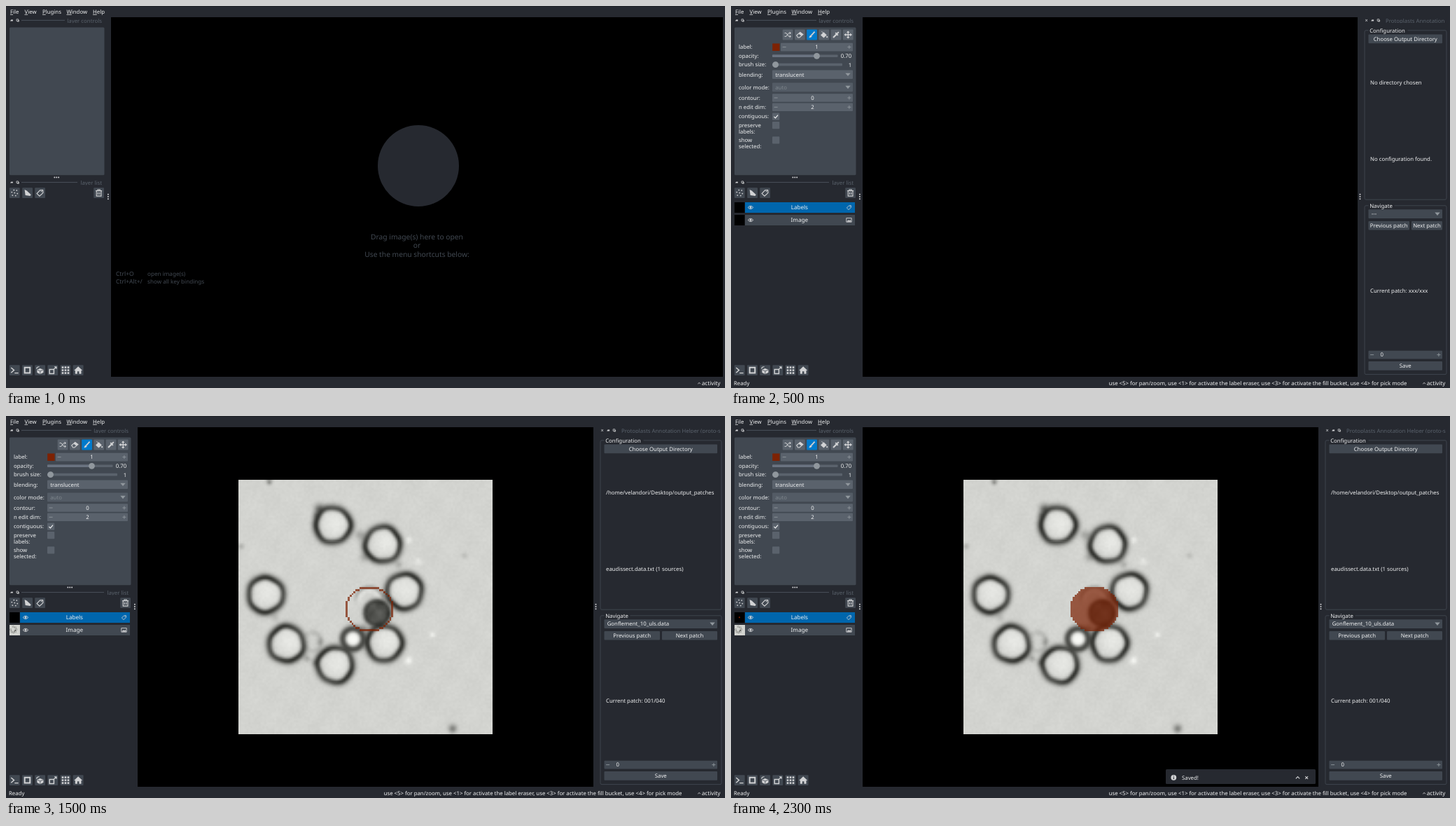
Write an HTML page with a canvas that moves like this. It is 1027x545 px and loops after 2500 ms.

```html
<!DOCTYPE html>
<html lang="en">
<head>
<meta charset="utf-8">
<title>Patch annotation</title>
<style>
html, body { margin: 0; width: 100%; height: 100%; overflow: hidden; background: #262930; }
svg { display: block; width: 100%; height: 100%; }
text { font: 7.8px "Noto Sans", sans-serif; white-space: pre; text-rendering: geometricPrecision; }
canvas { display: block; width: 100%; height: 100%; }
</style>
</head>
<body>
<svg viewBox="0 0 1027 545">
  <g id="ui"></g>
  <g id="photo">
    <foreignObject x="332" y="91" width="363" height="363"><canvas id="patch" width="128" height="128"></canvas></foreignObject>
    <foreignObject x="5" y="298" width="14.5" height="15"><canvas id="thumb" width="30" height="30"></canvas></foreignObject>
  </g>
  <g id="over"></g>
</svg>
<script>
const BG = '#262930', FG = '#414851', PRIMARY = '#5a626c', HANDLE = '#90979d',
      ICON = '#d1d2d4', TEXT = '#f0f1f2', BLUE = '#007acc', LABEL = '#7d2203';
const STEP = 500, STEPS = 5;
const PATCH = { x: 332, y: 91, n: 128, px: 363 / 128 };
const $ = id => document.getElementById(id);

// ---- drawing helpers
const rect = (x, y, w, h, fill, r = 0, more = '') =>
  `<rect x="${x}" y="${y}" width="${w}" height="${h}" rx="${r}" fill="${fill}" ${more}/>`;
const circle = (x, y, r, fill) => `<circle cx="${x}" cy="${y}" r="${r}" fill="${fill}"/>`;
const line = (d, color = ICON, w = 1) =>
  `<path d="${d}" fill="none" stroke="${color}" stroke-width="${w}"/>`;
const shape = (d, color = ICON) => `<path d="${d}" fill="${color}"/>`;
const text = (x, y, s, anchor = 'start', color = TEXT, size = 7.8) =>
  `<text x="${x}" y="${y}" text-anchor="${anchor}" style="fill:${color};font-size:${size}px">${s}</text>`;
const at = (x, y, body, k = 1) => `<g transform="translate(${x} ${y}) scale(${k})">${body}</g>`;
const tile = (x, y, icon, fill = FG) => rect(x - 7.4, y - 7.4, 14.8, 14.8, fill, 1) + at(x, y, icon);
const dots = (x, y, dx, dy) =>
  [-1, 0, 1].map(k => circle(x + k * dx, y + k * dy, 1, ICON)).join('');
const arrow = (x, y) => shape(`M${x - 3.7} ${y - 2}h7.4l-3.7 4.4z`, HANDLE);
const cross = (x, y, s, w = 1) =>
  line(`M${x - s} ${y - s}l${2 * s} ${2 * s}M${x + s} ${y - s}l${-2 * s} ${2 * s}`, ICON, w);

const button = (x, y, w, s) => rect(x, y, w, 12.7, FG, 1) + text(x + w / 2, y + 9.1, s, 'middle');
const spin = (x, y, right, value, fill, vx = (x + right) / 2) =>
  rect(x, y, right - x, 11.6, fill, 1) +
  line(`M${x + 2.6} ${y + 5.8}h5M${right - 7.6} ${y + 5.8}h5m-2.5-2.5v5`, HANDLE, .9) +
  text(vx, y + 8.6, value, 'middle');
const slider = (y, right, knob) =>
  rect(59, y - 1.8, right - 59, 3.6, PRIMARY, 1) + rect(59, y - 1.8, knob - 59, 3.6, '#6a7380', 1) +
  circle(knob, y, 4.4, HANDLE);
const combo = (x, y, right, value, fill, color = TEXT) =>
  rect(x, y, right - x, 12.6, fill, 1) + text(x + 4.2, y + 9, value, 'start', color) + arrow(right - 7, y + 6.2);
const checkbox = y => rect(59, y, 10.3, 10.3, PRIMARY, 1);

// ---- icons, centred on 0,0
const icon = {
  points: [[-4, -1], [-1, -4], [3, -3.5], [0, 0], [4, 1], [-3, 3.5], [1.5, 4]]
    .map(([x, y]) => circle(x, y, .95, ICON)).join(''),
  polygon: shape('M-4-4.5L-1-3L5 2.5L4 4.5L-3 3.5z'),
  tag: line('M-4.5 1L0-3.7L4-4L4.3 0L-.7 4.6z', ICON, 1.2) + circle(2, -1.8, .8, ICON),
  trash: line('M-4.5-3H4.5M-1.6-3V-4.6H1.6V-3M-3.4-3V4.5H3.4V-3M-1.2-.8V2.5M1.2-.8V2.5', ICON, 1.1),
  shell: line('M-5-3.6L-.8 0L-5 3.6M0 4H5.4', ICON, 1.4),
  square: line('M-3.8-3.8H3.8V3.8H-3.8z', ICON, 2),
  cube: shape('M0-2.6L4.8-.8V3.4L0 5.6L-4.3 3.4V-.8z') +
    line('M-4-.6L.2 1.3L4.6-.6M.2 1.3V5.4', FG, .8) + line('M-5-2Q-4.6-5-1-4.8', ICON, 1.1),
  move: line('M-4.6-1.2H1.6V4.8H-4.6z', ICON, 1.5) + line('M1.6-1.4L5-4.6M2.2-4.8H5.2V-1.8', ICON, 1.1),
  grid: [-4, 0, 4].map(x => [-4, 0, 4].map(y => rect(x - 1.3, y - 1.3, 2.6, 2.6, ICON)).join('')).join(''),
  home: shape('M0-5.4L6 .3H4.3V5.2H1.3V1.6H-1.3V5.2H-4.3V.3H-6z'),
  shuffle: line('M-4.5-2.4H-2.3L1.4 2.4H4M-4.5 2.4H-2.3L1.4-2.4H4M2.6-4L4.3-2.4L2.6-.8M2.6.8L4.3 2.4L2.6 4', ICON, 1),
  eraser: line('M-4.6 1L.4-3.6L4.6-.5L-.5 4H-2.6z', ICON, 1.1) + shape('M-2-1.4L.4-3.6L4.6-.5L2.2 1.6z'),
  brush: line('M4-4.4L-1 1.2', ICON, 1.8) + shape('M-1.8 .4L.2 2.2Q-1.2 4.7-4.4 4.2Q-3.2 3-3.2 1.7z'),
  fill: shape('M-4.8 .4L-.4-3.8L4 .4L-.4 4.5z') + line('M-3.3-4.8L.4-1', ICON, 1) + circle(4.4, 3.2, 1.1, ICON),
  picker: line('M-4 4L1-1', ICON, 2.2) + line('M-.8-2.8L2.8 .8M1.3-1.3L3.8-3.8', ICON, 1.9),
  pan: line('M-5 0H5M0-5V5', ICON, 1.3) +
    [0, 90, 180, 270].map(a => `<g transform="rotate(${a})">${shape('M0-5.6L2.3-2.9H-2.3z')}</g>`).join(''),
  eye: line('M-3.8 0Q0-4.4 3.8 0Q0 4.4-3.8 0z', ICON, .9) + circle(0, 0, 1.4, ICON),
  picture: line('M-3.7-2.8H3.7V2.8H-3.7z', ICON, .9) + shape('M-3 2.3L-1-.4L.4 1L1.7-.7L3.2 2.3z')
};

// ---- panels
const dockIcons = (x, y) =>
  shape(`M${x - 2} ${y + 1}l1.3-1.8h2.6v1.8z`) +
  line(`M${x + 7} ${y - 1.6}h2.6v2.6h-2.6zM${x + 8.2} ${y + 1.7}h2.2v-2.2`, ICON, .8);

// Dock titles lose their descenders at the lower edge.
function title(s, y, from, to, right) {
  return dockIcons(8, y) + line(`M22 ${y}H${from}`, PRIMARY, .7) +
    text(right, y + 3.1, s, 'end', PRIMARY) + rect(to, y + 3.9, right - to, 3, BG);
}

function frame(wide) {
  const right = wide ? 178.5 : 140.5, end = wide ? 175 : 137;
  const menu = [[6, 'File'], [26.5, 'View'], [52, 'Plugins'], [86.5, 'Window'], [124, 'Help']];
  return rect(0, 0, 1027, 545, BG) + rect(0, 0, 1027, 1, '#1f2228') +
    menu.map(([x, s]) => text(x, 10.8,
      `<tspan text-decoration="underline">${s[0]}</tspan>${s.slice(1)}`)).join('') +
    title('layer controls', 20.4, end - 53, end - 51, end) +
    rect(5, 30.4, right - 5, 210.8, FG, 1.5) +
    dots((5 + right) / 2 - .5, 244.4, 2.9, 0) +
    title('layer list', 251.6, end - 35, end - 33, end) +
    tile(12.3, 266.6, icon.points) + tile(30.6, 266.6, icon.polygon) + tile(48.6, 266.6, icon.tag) +
    tile(right - 7.9, 266.6, icon.trash) +
    dots(right + 5.4, 272, 0, 3.3) +
    ['shell', 'square', 'cube', 'move', 'grid', 'home']
      .map((k, i) => tile(12.3 + i * 18.17, 519.6, icon[k])).join('') +
    line('M988.2 539.2l1.9-1.8l1.9 1.8', ICON, .9) + text(1020.5, 541.2, 'activity', 'end', TEXT, 8.1);
}

function welcome() {
  const big = (y, s) => text(587, y, s, 'middle', FG, 10.26);
  return rect(150, 16, 874, 513, '#000') + circle(589, 228, 58, BG) +
    big(333, 'Drag image(s) here to open') + big(345.4, 'or') + big(357.6, 'Use the menu shortcuts below:') +
    text(157, 385, 'Ctrl+O', 'start', FG, 8.5) + text(202, 385, 'open image(s)', 'start', FG, 8.15) +
    text(157, 396.2, 'Ctrl+Alt+/', 'start', FG, 8.5) + text(202, 396.2, 'show all key bindings', 'start', FG, 8.15);
}

function controls() {
  const tools = ['shuffle', 'eraser', 'brush', 'fill', 'picker', 'pan'];
  const names = [[61.4, 'label:'], [74.3, 'opacity:'], [86.4, 'brush size:'], [100.6, 'blending:'],
    [118.7, 'color mode:'], [133.8, 'contour:'], [147.1, 'n edit dim:'], [160.4, 'contiguous:'],
    [172.9, 'preserve'], [181.6, 'labels:'], [194.1, 'show'], [202.8, 'selected:']];
  return tools.map((k, i) => tile(81.1 + i * 17.23, 41, icon[k], k === 'brush' ? BLUE : PRIMARY)).join('') +
    names.map(([y, s]) => text(11, y, s)).join('') +
    rect(59.2, 53.5, 10.3, 10.5, LABEL) + spin(71, 52.8, 174, 1, PRIMARY) +
    slider(71.3, 152.5, 122.5) + text(172.3, 74.3, '0.70', 'end') +
    slider(83.6, 159, 63.6) + text(172.3, 86.6, 1, 'end') +
    combo(59, 91.5, 174, 'translucent', PRIMARY) + combo(59, 109.6, 174, 'auto', '#535b65', '#7f878e') +
    spin(59, 125.2, 174, 0, PRIMARY) + spin(59, 138.5, 174, 2, PRIMARY) +
    checkbox(152.4) + line('M61.4 157.8l2 2l3.6-4.2', TEXT, 1.2) + checkbox(165) + checkbox(186.2);
}

function layer(y, name, fill, mark) {
  return rect(5, y, 14.5, 15, '#000') + rect(20, y, 157, 15, fill) +
    at(28, y + 7.4, icon.eye) + text(97.8, y + 10.3, name, 'middle', TEXT, 8.1) + at(168.5, y + 7.4, mark);
}

function group(x, y, h, name, w) {
  return rect(x, y, 1022 - x, h, 'none', 2, `stroke="${FG}" stroke-width=".9"`) +
    rect(x + 5.5, y - 2, w, 4, BG) + text(x + 7.2, y + 2.8, name);
}

function annotator(loaded) {
  const x = loaded ? 849 : 905, l = x + 5.5, full = 1016 - l;
  const split = loaded ? 934 : 969, next = loaded ? 937 : 972;
  return dots(x - 6.5, 272, 0, 3.3) + cross(x + 2.6, 20.5, 1.4, .9) + dockIcons(x + 11.2, 20.4) +
    text(x + 30, 23.5, loaded ? 'Protoplasts Annotation Helper (proto-s' : 'Protoplasts Annotation', 'start', PRIMARY) +
    rect(x + 28, 24.3, 150, 3, BG) + rect(1021.5, 16, 6, 10, BG) +
    group(x, 34.8, 241.4, 'Configuration', 56) +
    button(l, 40.6, full, 'Choose Output Directory') +
    text(x + 8, 112.3, loaded ? '/home/velandori/Desktop/output_patches' : 'No directory chosen') +
    text(x + 8, 220.8, loaded ? 'eaudissect.data.txt (1 sources)' : 'No configuration found.') +
    group(x, 284.8, 240.8, 'Navigate', 37) +
    combo(l, 290.3, 1016, loaded ? 'Gonflement_10_uls.data' : '---', FG) +
    button(l, 306.9, split - l, 'Previous patch') + button(next, 306.9, 1016 - next, 'Next patch') +
    text(x + 8, 409.2, 'Current patch: ' + (loaded ? '001/040' : 'xxx/xxx')) +
    spin(l, 491.8, 1016, 0, FG, x + 24.7) + button(l, 507, full, 'Save');
}

function editor(loaded, ready) {
  return rect(188, 16, loaded ? 651 : 707, 513, '#000') + controls() +
    layer(280, 'Labels', '#0066ad', at(0, 0, icon.tag, .7)) +
    layer(298, 'Image', FG, icon.picture) + annotator(loaded) +
    (ready ? text(4, 541.2, 'Ready') : '') +
    text(965.5, 541.2, 'use &lt;5&gt; for pan/zoom, use &lt;1&gt; for activate the label eraser, ' +
      'use &lt;3&gt; for activate the fill bucket, use &lt;4&gt; for pick mode', 'end');
}

// Painted label on the patch's pixel grid, as outline or solid.
function label(solid) {
  const inside = (i, j) => ((i - 65.5) / 12.35) ** 2 + ((j - 64.5) / 11.3) ** 2 <= 1;
  let d = '';
  for (let j = 52; j < 79; j++) for (let i = 52; i < 80; i++) {
    const edge = !(inside(i - 1, j) && inside(i + 1, j) && inside(i, j - 1) && inside(i, j + 1));
    if (inside(i, j) && (solid || edge)) d += `M${i} ${j}h1v1h-1z`;
  }
  return `<path d="${d}" transform="translate(${PATCH.x} ${PATCH.y}) scale(${PATCH.px})"
    fill="${LABEL}" opacity=".7" shape-rendering="crispEdges"/>`;
}

const toast = () => rect(621, 504, 214, 21, BG, 1.5) + circle(632.3, 515.8, 3.9, ICON) +
  line('M632.3 515.3v2.6M632.3 513.2v1.1', BG, 1.1) + text(644, 519.1, 'Saved!') +
  line('M806.8 517.4l2.7-2.7l2.7 2.7', ICON, 1.2) + cross(822.2, 516, 1.9, 1.1);

// ---- microscope patch, one formula per pixel
function paintPatch() {
  const cells = [[467, 155.5], [538, 183], [569, 250], [371, 255], [400.5, 325], [470, 355], [540.5, 324]];
  const spots = [[447, 132, 7, -85], [443, 142, 5, -50], [376, 94, 4, -75], [638, 446, 6, -85], [336, 186, 4, -35],
    [655, 199, 4, -22], [506, 170, 7, -45], [511, 202, 6, -35], [575, 349, 5, 32], [609, 312, 4, 25],
    [575, 177, 5, 25], [589, 208, 5, 18], [561, 212, 5, -35], [430, 346, 5, -45], [442, 352, 5, -45],
    [448, 322, 5, -35], [384, 287, 6, -25], [511, 303, 6, -60]];
  const bell = (e, w) => Math.exp(-((e / w) ** 2));
  const mix = (a, b, k) => a + (b - a) * k;
  const disk = (e, w) => 1 / (1 + Math.exp(e / w));
  let seed = 7;
  const rnd = () => (seed = seed * 16807 % 2147483647) / 2147483647 - .5;
  const { n, px } = PATCH;
  const ctx = $('patch').getContext('2d'), img = ctx.createImageData(n, n);
  for (let p = 0; p < n * n; p++) {
    const x = PATCH.x + (p % n + .5) * px, y = PATCH.y + (Math.floor(p / n) + .5) * px;
    const grain = rnd() * 6 + 2 * Math.sin(x / 9) * Math.sin(y / 11 + x / 40);
    let v = 211 + grain;
    for (const [sx, sy, r, k] of spots) v += k * bell(Math.hypot(x - sx, y - sy), r);
    const halo = Math.hypot(x - 519, y - 264);
    v += (14 * bell(halo - 15, 4) - 42 * bell(halo - 20, 3)) * disk(y - 262, 3);
    v -= 26 * bell(Math.hypot(x - 437, y - 322) - 13, 4) * disk(430 - x, 5);
    cells.forEach(([cx, cy], k) => {
      const dx = x - cx, dy = y - cy, a = Math.atan2(dy, dx);
      const r = 24.4 * (1 + .012 * Math.cos(6 * a + k) + .022 * Math.cos(3 * a - 2 * k));
      const d = Math.hypot(dx, dy), e = d - r;
      v = mix(v, 229 - 22 * (d / r) ** 2 + (dx - dy) * .25 + grain, disk(e, 1.5));
      v *= 1 - (.69 + .08 * Math.cos(2 * a + k)) * bell(e, e > 0 ? 4.8 : 4);
      v -= 12 * bell(e - 6, 4);
    });
    const dark = Math.hypot(x - 530, y - 281);
    v = mix(v, 82 + 12 * Math.sin(x / 4) * Math.cos(y / 5) + grain - 35 * bell(dark - 18, 4), disk(dark - 20, 1.5));
    const small = Math.hypot(x - 495.5, y - 318);
    v = mix(v, mix(52, 250, disk(small - 10.5, 1.5)), disk(small - 18.5, 1.6));
    img.data.set([v, v + 1, v - 3, 255], p * 4);
  }
  ctx.putImageData(img, 0, 0);
  const mini = $('thumb').getContext('2d');
  mini.imageSmoothingQuality = 'high';
  mini.drawImage($('patch'), 0, 0, 30, 30);
}

// ---- timeline
let shown = -1;
function draw(t) {
  const step = Math.floor(t / STEP) % STEPS;
  if (step === shown) return;
  shown = step;
  const loaded = step >= 2;
  $('ui').innerHTML = frame(step > 0) + (step ? editor(loaded, step !== 2) : welcome());
  $('photo').style.display = loaded ? '' : 'none';
  $('over').innerHTML =
    (step === 2 || step === 4 ? circle(12, 287.3, 1.1, LABEL) : '') +
    (step >= 3 ? label(step === 4) : '') + (step === 4 ? toast() : '');
}

paintPatch();
const start = performance.now();
function tick() {
  draw(performance.now() - start);
  requestAnimationFrame(tick);
}
tick();
</script>
</body>
</html>
```
